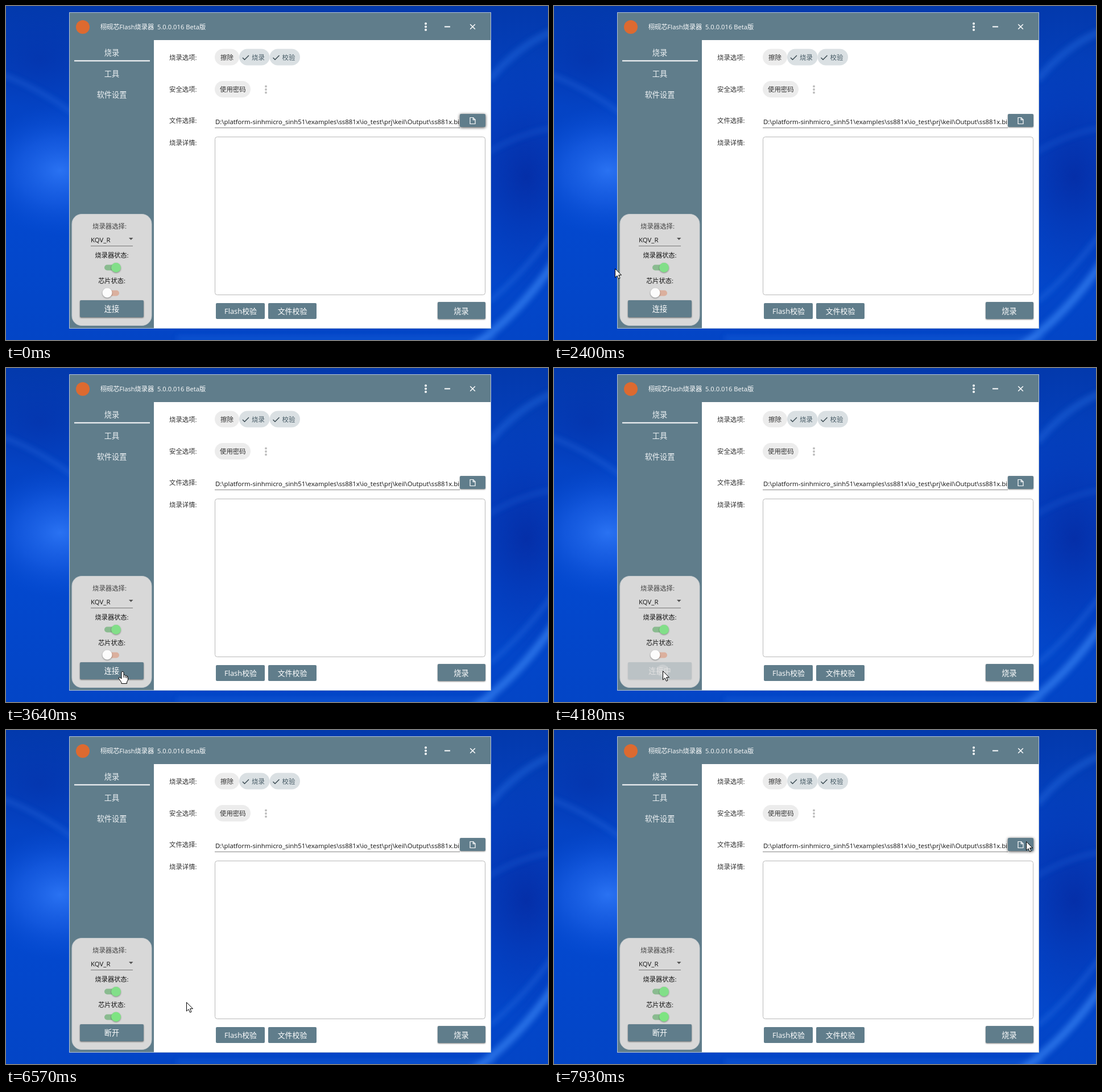
An HTML page for the animation above (8 s loop, 953 by 588 pixels).

```html
<!DOCTYPE html>
<html lang="zh-CN">
<head>
<meta charset="utf-8">
<title>Flash烧录器</title>
<style>
html, body { margin: 0; width: 100%; height: 100%; overflow: hidden; background: #0444c4; }
svg { display: block; width: 953px; height: 588px; }
text { font: 11.4px "Open Sans", "Noto Sans CJK SC", "Noto Sans CJK", sans-serif; fill: #333; white-space: pre; }
.mid { text-anchor: middle; }
.white { fill: #fff; }
.nav { font-size: 13.2px; fill: #eef2f4; text-anchor: middle; }
.btn { fill: #607d8b; filter: drop-shadow(0 1px 1.2px rgba(0, 0, 0, .5)); }
.cap { font-size: 12.9px; fill: #fff; text-anchor: middle; }
.knob { filter: drop-shadow(0 1px 1px rgba(0, 0, 0, .4)); }
.line { fill: none; stroke: #fff; stroke-width: 1.5; }
</style>
</head>
<body>
<svg viewBox="0 0 953 588">
  <defs>
    <linearGradient id="sky" x1="0" y1="0" x2="0" y2="1">
      <stop offset="0" stop-color="#0339ac"/>
      <stop offset=".3" stop-color="#0443c4"/>
      <stop offset=".65" stop-color="#0348ce"/>
      <stop offset="1" stop-color="#0345c6"/>
    </linearGradient>
    <radialGradient id="glow">
      <stop offset="0" stop-color="#2a72f2"/>
      <stop offset=".5" stop-color="#1a60e6" stop-opacity=".65"/>
      <stop offset="1" stop-color="#0a50d8" stop-opacity="0"/>
    </radialGradient>
    <radialGradient id="dusk">
      <stop offset="0" stop-color="#0529a0" stop-opacity=".8"/>
      <stop offset="1" stop-color="#0530a8" stop-opacity="0"/>
    </radialGradient>
    <filter id="soft" x="-50%" y="-50%" width="200%" height="200%"><feGaussianBlur stdDeviation="5"/></filter>
    <clipPath id="pathClip"><rect x="367" y="190" width="431" height="26"/></clipPath>
    <clipPath id="linkClip"><rect x="130" y="518" width="112" height="30" rx="2"/></clipPath>
  </defs>

  <rect width="953" height="588" fill="url(#sky)"/>
  <ellipse cx="95" cy="290" rx="150" ry="115" fill="url(#glow)"/>
  <ellipse cx="915" cy="300" rx="150" ry="210" fill="url(#dusk)"/>
  <ellipse cx="60" cy="95" rx="120" ry="90" fill="url(#dusk)" opacity=".45"/>
  <g fill="none" stroke="#3b86f5" filter="url(#soft)">
    <path d="M-10 120Q50 140 120 190" stroke-width="8" opacity=".25"/>
    <path d="M850 130Q900 70 960 45" stroke-width="12" opacity=".3"/>
    <path d="M840 262Q900 225 960 215" stroke-width="8" opacity=".2"/>
    <path d="M820 600Q900 545 965 450" stroke-width="14" opacity=".65"/>
    <path d="M850 520Q910 470 965 395" stroke-width="8" opacity=".3"/>
    <path d="M300 585H860" stroke-width="10" opacity=".2"/>
  </g>

  <rect x="111.5" y="11.5" width="741" height="556" fill="#fff" stroke="#b4c4d8"/>
  <path d="M112 12H852V60H260V567H112Z" fill="#607d8b"/>

  <circle cx="135" cy="37" r="12" fill="#dd6a30"/>
  <text class="white" x="166" y="41" style="font-size:11.2px">栩砚芯Flash烧录器</text>
  <text class="white" x="266" y="41" style="font-size:11.2px">5.0.0.016 Beta版</text>
  <g fill="#fff"><circle cx="738" cy="31" r="2"/><circle cx="738" cy="36.5" r="2"/><circle cx="738" cy="42" r="2"/></g>
  <path class="line" d="M771 36.5H781" style="stroke-width:2"/>
  <path class="line" d="M816.2 32.2L824.8 40.8M824.8 32.2L816.2 40.8"/>

  <text class="nav white" x="186" y="87">烧录</text>
  <path d="M120 96.5H253" stroke="#fff" stroke-width="2"/>
  <text class="nav" x="186" y="123.500">工具</text>
  <text class="nav" x="186" y="160.500">软件设置</text>

  <rect x="116" y="366.500" width="140" height="196" rx="17" fill="#d8d8d8" stroke="#c3c9cc"/>
  <text x="152" y="391.500" style="fill:#444">烧录器选择:</text>
  <text x="149" y="415.500" style="fill:#111">KQV_R</text>
  <path d="M216 408H223.500L219.750 412Z" fill="#555"/>
  <path d="M149 422.500H223" stroke="#777"/>
  <text class="mid" x="186" y="442.500" style="fill:#111;font-size:11.2px">烧录器状态:</text>
  <rect x="173" y="455.500" width="26" height="10" rx="5" fill="#8abb90"/>
  <circle class="knob" cx="193.500" cy="460.500" r="8.500" fill="#82df89"/>
  <text class="mid" x="186" y="487.500" style="fill:#111;font-size:11.2px">芯片状态:</text>
  <rect id="track" x="173" y="500.500" width="26" height="10" rx="5"/>
  <circle id="knob" class="knob" cy="505" r="8.500"/>

  <g id="link">
    <rect class="btn" x="130" y="518" width="112" height="30" rx="2"/>
    <circle id="ripple" cx="191" cy="533" fill="#fff" clip-path="url(#linkClip)"/>
    <text id="linkText" class="cap" x="186" y="538" style="font-size:13.2px">连接</text>
  </g>

  <text x="287" y="94.500">烧录选项:</text>
  <text x="287" y="150.500">安全选项:</text>
  <text x="287" y="206">文件选择:</text>
  <text x="287" y="245">烧录详情:</text>

  <rect x="367" y="75.500" width="43" height="29" rx="14.500" fill="#ececec"/>
  <rect x="410" y="75.500" width="53.500" height="29" rx="14.500" fill="#dae0e3"/>
  <rect x="463.500" y="75.500" width="53.500" height="29" rx="14.500" fill="#dae0e3"/>
  <text x="377" y="94.500">擦除</text>
  <text x="432" y="94.500" style="fill:#465a65">烧录</text>
  <text x="485.500" y="94.500" style="fill:#465a65">校验</text>
  <path d="M416 91L419.500 94.500L427 87M469.500 91L473 94.500L480.500 87" fill="none" stroke="#37474f" stroke-width="1.400"/>
  <rect x="367" y="132" width="63" height="29" rx="14.500" fill="#ececec"/>
  <text x="376" y="150.500">使用密码</text>
  <g fill="#bcbcbc"><circle cx="457" cy="141.500" r="1.900"/><circle cx="457" cy="147" r="1.900"/><circle cx="457" cy="152.500" r="1.900"/></g>

  <text x="368" y="207.500" clip-path="url(#pathClip)" style="fill:#111">D:\platform-sinhmicro_sinh51\examples\ss881x\io_test\prj\keil\Output\ss881x.bin</text>
  <path d="M367 214.500H798" stroke="#858585"/>
  <rect id="file" class="btn" x="798" y="190" width="45" height="23" rx="2"/>
  <path class="line" d="M816 196.500H821.500L825 200V207.500H816ZM821.300 196.500V200.300H825" style="stroke-width:1.200"/>

  <rect x="367.500" y="230.500" width="475" height="278" rx="4" fill="#fff" stroke="#b8b8b8"/>
  <rect class="btn" x="369" y="523" width="86" height="28" rx="2" style="filter:none"/>
  <text class="cap" x="412.500" y="541.500">Flash校验</text>
  <rect class="btn" x="461" y="523" width="85" height="28" rx="2" style="filter:none"/>
  <text class="cap" x="503.500" y="541.500">文件校验</text>
  <rect class="btn" x="759" y="521" width="84" height="30" rx="2"/>
  <text class="cap" x="800.500" y="541.500" style="font-size:13.200px">烧录</text>

  <g id="cursor" stroke="#000" stroke-linejoin="round">
    <path id="arrow" fill="#fff" d="M.5 .5V16L4 12.700L6.500 18.200L9 17.100L6.600 11.700H11.500Z"/>
    <g id="hand">
      <path fill="#fff" d="M-2 1.500Q0 -1 2 1.500V6.500Q4 5.500 5 7.500Q7 6.500 7.500 8.500Q9.500 8 9.500 10.500V15L7.500 19V21.500H-2V19.500L-6.500 13Q-7.500 10.500 -5 10.500L-2 13Z"/>
      <path fill="none" d="M2 6.500V11M5 7.500V11.500M7.500 8.500V12"/>
    </g>
  </g>
</svg>
<script>
const LOOP = 8000, STEP = LOOP / 117;
const el = id => document.getElementById(id);
const clamp = v => Math.min(1, Math.max(0, v));
const ramp = (t, a, b) => clamp((t - a) / (b - a));
const mix = (a, b, k) => `rgb(${a.map((v, i) => Math.round(v + (b[i] - v) * k))})`;

// Cursor strokes: [time, x, y]; the cursor rests between strokes.
const strokes = [
  [[1846, 250, 582], [1990, 283, 500], [2120, 232, 420], [2200, 180, 408], [2300, 132, 424],
   [2393, 107, 462], [2462, 104, 492], [2600, 125, 540], [2690, 185, 551], [2780, 268, 522],
   [2860, 297, 470], [2960, 240, 414], [3050, 172, 411], [3145, 124, 449], [3220, 119, 485],
   [3420, 134, 533], [3487, 180, 537], [3556, 228, 536], [3624, 205, 534], [3700, 191, 533]],
  [[5264, 235, 525]],
  [[6150, 235, 525], [6360, 258, 512], [6564, 317, 479], [6975, 702, 334], [7300, 835, 235],
   [7500, 860, 200], [7660, 842, 188], [7795, 825, 196], [7863, 828, 192], [7931, 830, 196]]
];

function along(p, t) {
  const last = p.length - 1;
  if (t >= p[last][0]) return p[last].slice(1);
  const i = p.findIndex(q => q[0] > t) - 1;
  const a = p[i], b = p[i + 1], h = b[0] - a[0], u = (t - a[0]) / h;
  const slope = (j, d) => {
    if (j === 0 || j === last) return 0;
    return (p[j + 1][d] - p[j - 1][d]) / (p[j + 1][0] - p[j - 1][0]);
  };
  return [1, 2].map(d => {
    const s = u * u * (3 - 2 * u);
    return a[d] + (b[d] - a[d]) * s
      + h * u * (1 - u) * (slope(i, d) * (1 - u) - slope(i + 1, d) * u);
  });
}

function draw(now) {
  const t = Math.floor((now % LOOP + 6) / STEP) * STEP;

  const stroke = strokes.filter(s => s[0][0] <= t + 1).pop();
  el('cursor').style.display = stroke ? '' : 'none';
  if (stroke) {
    const [x, y] = along(stroke, Math.max(t, stroke[0][0]));
    const onLink = x > 130 && x < 242 && y > 518 && y < 548;
    const onFile = x > 798 && x < 843 && y > 190 && y < 213;
    const hand = onLink && (t > 3480 && t < 4030 || t > 5260) || onFile && t < 7900;
    el('cursor').setAttribute('transform', `translate(${Math.round(x)} ${Math.round(y)})`);
    el('hand').style.display = hand ? '' : 'none';
    el('arrow').style.display = hand ? 'none' : '';
  }

  const busy = t > 4030 && t < 5300, linked = t >= 5300;
  el('link').style.opacity = busy ? .23 : 1;
  el('linkText').textContent = linked ? '断开' : busy ? '连接中' : '连接';
  el('ripple').setAttribute('r', 7 + 11 * ramp(t, 4030, 4450));
  el('ripple').style.opacity = busy ? .5 * (1 - ramp(t, 4100, 4450)) : 0;

  const on = ramp(t, 5300, 5600);
  el('knob').setAttribute('cx', 178 + 15.5 * on);
  el('knob').setAttribute('fill', mix([252, 252, 252], [126, 228, 130], on));
  el('track').setAttribute('fill', mix([219, 176, 158], [138, 187, 144], on));

  const lift = Math.max(1 - ramp(t, 0, 205), ramp(t, 7480, 7700));
  el('file').style.filter =
    `drop-shadow(0 1px ${1.2 + 1.3 * lift}px rgba(0,0,0,${.45 + .3 * lift}))`;
}

const start = performance.now();
function tick() {
  draw(performance.now() - start);
  requestAnimationFrame(tick);
}
draw(0);
requestAnimationFrame(tick);
</script>
</body>
</html>
```
